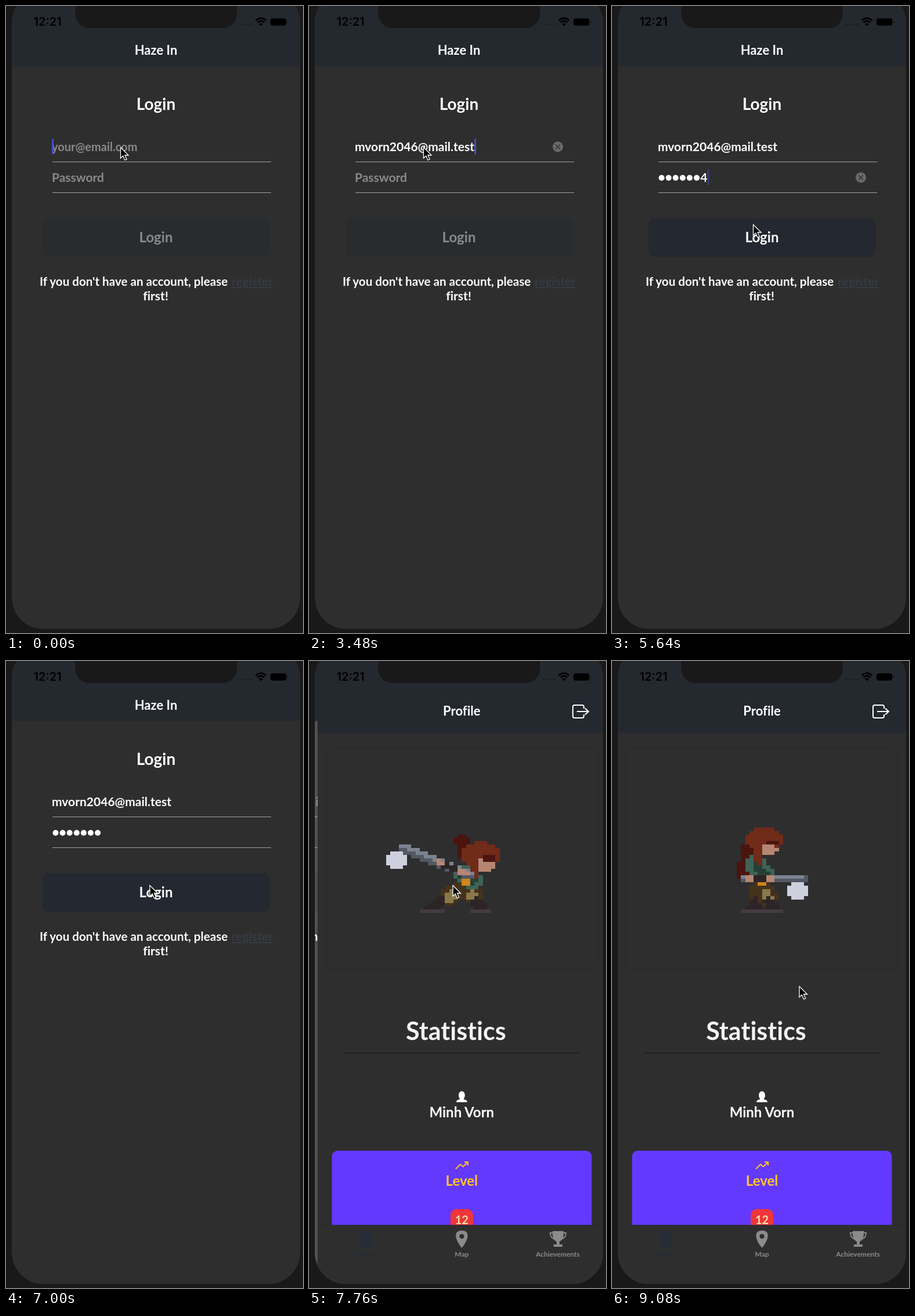
An HTML page for the animation above (9120 ms loop, 512x1080 px).

```html
<!DOCTYPE html>
<html lang="en">
<head>
<meta charset="utf-8">
<title>Login flow</title>
<style>
  html, body { margin: 0; width: 100%; height: 100%; overflow: hidden; background: #191919; }
  svg { display: block; width: 512px; height: 1080px; }
  text { font: 700 21px Lato, sans-serif; font-variant-ligatures: none; fill: #fff; white-space: pre; }
  .mid { text-anchor: middle; }
  .hint { fill: #8a8a8a; }
  .line { fill: none; stroke-width: 2; }
  .tab text { font-size: 12px; }
  .tab, .tab text { fill: #8b8b8b; }
  .tab.on, .tab.on text { fill: #252d38; }
</style>
</head>
<body>
<svg viewBox="0 0 512 1080">
  <defs>
    <clipPath id="screen"><rect x="10" y="-25" width="497" height="1098" rx="54"/></clipPath>
    <clipPath id="aboveTabs"><rect width="512" height="971.5"/></clipPath>
    <g id="clear"><circle r="9"/><path d="M-4-4 4 4M4-4-4 4" stroke="#2e2e2e" stroke-width="1.3"/></g>
    <path id="sheet" d="M93 982 107 988 93 995 79 988Z"/>
  </defs>

  <g clip-path="url(#screen)">
    <rect width="512" height="1080" fill="#2e2e2e"/>
    <rect width="512" height="103.5" fill="#242930"/>

    <g id="login">
      <text id="appTitle" class="mid" x="258.5" y="84" style="font-size:22px">Haze In</text>
      <text class="mid" x="258.5" y="179" style="font-size:28px">Login</text>
      <path d="M80 268.5H457M80 321.5H457" stroke="#a2a2a2"/>
      <rect id="highlight" x="60" y="268" width="397" height="53.5" fill="#b5b5b5"/>
      <text id="mailHint" class="hint" x="79" y="250" style="font-size:20px">your@email.com</text>
      <text id="passHint" class="hint" x="79" y="303">Password</text>
      <text id="mail" x="79" y="250"></text>
      <g id="bullets" fill="#fff"></g>
      <text id="lastKey" y="303"></text>
      <rect id="caret" width="2.6" height="27" rx="1" fill="#4553dc"/>
      <use id="mailClear" href="#clear" x="429" y="242.5" fill="#6a6a6a"/>
      <use id="passClear" href="#clear" x="429" y="295.5"/>
      <g id="button">
        <rect id="buttonBack" x="62.5" y="365.5" width="392" height="66.5" rx="11"/>
        <text id="buttonText" class="mid" x="258.5" y="407" style="font-size:24px">Login</text>
      </g>
      <text x="58" y="482" style="font-size:20.6px">If you don't have an account, please </text>
      <text x="389" y="482" style="fill:#363b44;text-decoration:underline">register</text>
      <text class="mid" x="258" y="507">first!</text>
    </g>
    <rect id="veil" y="103.5" width="512" height="977" fill="#fff"/>

    <g id="profile">
      <rect x="10" width="497" height="1080" fill="#2e2e2e"/>
      <rect x="10" width="497" height="124" fill="#242930"/>
      <text class="mid" x="258.5" y="94" style="font-size:22px">Profile</text>
      <path class="line" d="M469 82V79Q469 76 466 76H453Q450 76 450 79V95Q450 98 453 98H466Q469 98 469 95V92M457 87H476M471 81.5 477 87 471 92.5" stroke="#fff"/>
      <rect x="26" y="151" width="465" height="378" rx="10" fill="#2e2e2e" style="filter:drop-shadow(0 0 4px #0002)"/>
      <g id="sprite" transform="translate(26.5 151) scale(7.25 5.9)" shape-rendering="crispEdges"></g>
      <text class="mid" x="248.5" y="653" style="font-size:43px;fill:#f4f4f6">Statistics</text>
      <path d="M54 675.5H463" stroke="#171717"/>
      <g fill="#fff"><ellipse cx="258.5" cy="748" rx="5.5" ry="7"/><path d="M255 752H262V755Q268 756 268 760H249Q249 756 255 755Z"/></g>
      <text class="mid" x="258.5" y="786" style="font-size:24px">Minh Vorn</text>
      <g clip-path="url(#aboveTabs)">
        <rect x="34.5" y="843.5" width="448" height="200" rx="10" fill="#6439ff"/>
        <path class="line" d="M248 875 256 867 261 871 269 863M263 863H269V869" stroke="#ffc629"/>
        <text class="mid" x="258.5" y="904" style="font-size:24px;fill:#ffc629">Level</text>
        <rect x="239" y="944" width="39" height="40" rx="11" fill="#f0353b"/>
        <text class="mid" x="258.5" y="970" style="font-size:20px;fill:#ffe0a3">12</text>
      </g>
      <path d="M10 972H507" stroke="#292929"/>
      <g class="tab on mid">
        <use href="#sheet"/><use href="#sheet" y="8"/><use href="#sheet" y="16"/>
        <text x="93" y="1026">Profile</text>
      </g>
      <g class="tab mid">
        <path d="M258.5 981C272 981 272 994 258.5 1011C245 994 245 981 258.5 981Z"/>
        <circle cx="258.5" cy="991" r="4" fill="#2e2e2e"/>
        <text x="258.5" y="1026">Map</text>
      </g>
      <g class="tab mid">
        <path d="M415 982H434V986C434 995 431 998 427 1000V1005H432V1009H417V1005H422V1000C418 998 415 995 415 986Z"/>
        <path class="line" d="M415 985H411Q411 994 419 996M434 985H438Q438 994 430 996" stroke="#8b8b8b"/>
        <text x="424" y="1026">Achievements</text>
      </g>
    </g>
  </g>

  <path d="M119.5 0V14A24 24 0 0 0 143.5 38H374A24 24 0 0 0 398 14V0Z" fill="#191919"/>
  <text x="47.5" y="34" style="font:600 20px Inter,sans-serif;fill:#000">12:21</text>
  <path d="M405 32H424" stroke="#15181c" stroke-width="4" stroke-linecap="round" stroke-dasharray="0 6" opacity=".55"/>
  <path d="M430.500 25Q439.500 17 448.500 25M433.500 28.500Q439.500 23 445.500 28.500" fill="none" stroke="#000" stroke-width="2.700"/>
  <path d="M436 31Q439.500 28 443 31L439.500 34.500Z"/>
  <rect x="456" y="21.500" width="27" height="12" rx="3.500" stroke="#000" stroke-opacity=".45"/>
  <path d="M485 25Q488 27.500 485 30Z" opacity=".6"/>
  <path id="pointer" d="M0 0V18.500L4.300 14.600 7.500 22 10.600 20.700 7.500 13.500H13.500Z" stroke="#fff" stroke-width="1.300"/>
</svg>

<script>
const LOOP = 9120, MAIL = 'mvorn2046@mail.test', PASS = 'hzk82m4';
const $ = id => document.getElementById(id);
const set = (id, attrs) => { for (const k in attrs) $(id).setAttribute(k, attrs[k]); };
const show = (id, on) => set(id, { opacity: +on });
const ramp = (t, a, b) => Math.min(1, Math.max(0, (t - a) / (b - a)));
const ease = (t, a, b) => { const x = ramp(t, a, b); return x * x * (3 - 2 * x); };

// Pixel figure: simple solids sampled on a 64 x 64 grid, posed by its joints
const add = ([x, y], dx, dy) => [x + dx, y + dy];
const mix = (a, b, k) => [a[0] + (b[0] - a[0]) * k, a[1] + (b[1] - a[1]) * k];
const oval = ([cx, cy], rx, ry) => (x, y) => Math.hypot((x - cx) / rx, (y - cy) / ry) <= 1;
const limb = (a, b, width) => (x, y) => {
  const dx = b[0] - a[0], dy = b[1] - a[1];
  const [px, py] = mix(a, b, ramp((x - a[0]) * dx + (y - a[1]) * dy, 0, dx * dx + dy * dy));
  return Math.hypot(x - px, y - py) <= width / 2;
};
// Broken crescent left behind by the swing
const crescent = (x, y) => {
  const angle = Math.atan2((y - 36) / 12, (x - 34) / 23) * 180 / Math.PI;
  return oval([34, 36], 23, 12)(x, y) && !oval([35, 34.5], 18, 9)(x, y)
    && angle > -95 && angle < 176 && (angle > 110 || (angle + 100) % 34 > 6);
};

const poses = {
  idle: { head: [32.5, 26.5], tail: [27.5, 37], hip: [32, 40], feet: [[30, 46.5], [34.5, 46.5]],
    grip: [28, 38], point: [41.5, 38], blade: [40.5, 41.5] },
  slash: { head: [36, 30], tail: [20, 34.5], hip: [34, 40], feet: [[27, 45.5], [38, 42]],
    grip: [33, 36], point: [12, 36] },
  recover: { head: [36.5, 31], tail: [32, 27], hip: [33, 40], feet: [[25, 46.5], [36.5, 46.5]],
    grip: [34, 37], point: [18, 29], blade: [16.5, 32.5] }
};

function figure({ head, tail, hip, feet, grip, point, blade }) {
  let art = '';
  const fill = (color, inside) => {
    let d = '';
    for (let y = 0; y < 64; y++) for (let x = 0; x < 64; x++)
      if (inside(x + .5, y + .5)) d += `M${x} ${y}h1v1h-1z`;
    art += `<path fill="${color}" d="${d}"/>`;
  };
  const shoulder = add(head, -2, 7.5);
  fill('#4a150f', limb(add(head, -3, 1), tail, 3.6));
  for (const foot of feet) {
    fill('#45321c', limb(hip, mix(hip, foot, .5), 5));
    fill('#8a784b', limb(mix(hip, foot, .4), mix(hip, foot, .6), 2.6));
    fill('#2c2426', limb(mix(hip, foot, .75), foot, 3));
    fill('#453a40', oval(add(foot, 0, 1), 2.6, .8));
  }
  fill('#3f6355', limb(shoulder, add(hip, 0, -3.5), 5.5));
  fill('#702b19', oval(head, 4.8, 3.6));
  fill('#b58672', oval(add(head, 1.2, 3), 2, 2));
  fill('#702b19', limb(add(head, -1.5, 0), add(head, -1.5, 7), 1.2));
  fill('#4a150f', limb(add(head, 1, 1), add(head, 3, 1), 1));
  fill('#273e37', limb(shoulder, mix(grip, point, .4), 2.2));
  fill('#cd851f', oval(add(hip, 0, -1), 1.1, 1));
  fill('#525964', limb(grip, point, 2.4));
  fill('#7b8290', limb(add(grip, 0, -.6), add(point, 0, -.6), 1.2));
  fill('#2c2426', limb(mix(grip, point, .2), mix(grip, point, .35), 2));
  for (const k of [.1, .45]) fill('#b58672', oval(mix(grip, point, k), 1.2, 1.1));
  fill('#cfd0de', blade ? oval(blade, 2.8, 2.5) : crescent);
  return art;
}
for (const name in poses) $('sprite').innerHTML += `<g id="${name}">${figure(poses[name])}</g>`;

[...PASS].forEach((_, i) => {
  $('bullets').innerHTML += `<circle cx="${85.5 + 12.1 * i}" cy="296" r="5"/>`;
});

// Moment of each key press: an even rhythm with a few hesitations
const hesitations = [8, 9, 16, 17, 18];
const mailKeys = [...MAIL].map((_, i) => 120 * (i + 1) + 95 * hesitations.filter(h => h <= i).length);
const passKeys = [...PASS].map((_, i) => 4280 + i * 122);
const pressed = (keys, t) => keys.filter(k => k <= t).length;

function blink(age) {
  const p = age < 640 ? age : 640 + (age - 640) % 1000;
  if (p < 640) return 1 - ramp(p, 300, 440) + ramp(p, 620, 640);
  return 1 - ramp(p, 1040, 1180) + ramp(p, 1600, 1640);
}

function drawForm(t) {
  const cleared = t >= 7160, inPass = t >= 3760;
  const typed = cleared ? 0 : pressed(mailKeys, t), secret = cleared ? 0 : pressed(passKeys, t);
  $('mail').textContent = MAIL.slice(0, typed);
  show('mailHint', !typed);
  show('passHint', !secret);

  const masked = t < 6000 ? Math.max(0, secret - 1) : secret;
  [...$('bullets').children].forEach((dot, i) => dot.setAttribute('opacity', +(i < masked)));
  $('lastKey').textContent = PASS.slice(masked, secret);
  set('lastKey', { x: 79 + 12.2 * masked });

  const end = inPass ? 79 + 12.2 * masked + $('lastKey').getComputedTextLength()
                     : 79 + $('mail').getComputedTextLength();
  const last = Math.max(0, inPass ? 3760 : 0, ...mailKeys.concat(passKeys).filter(k => k <= t));
  set('caret', { x: end + .3, y: inPass ? 281.5 : 228.5, opacity: t < 6040 ? blink(t - last) : 0 });

  const glow = ramp(t, 3800, 3960) - ramp(t, 4560, 4640);
  show('highlight', glow);
  show('mailClear', typed && !inPass);
  show('passClear', secret && t < 6040);
  set('passClear', { fill: glow > .5 ? '#555' : '#6a6a6a' });

  const ready = secret > 5 || cleared;
  set('buttonBack', { fill: ready ? '#242830' : '#292c2e' });
  $('buttonText').style.fill = ready ? '#fff' : '#8a8a8a';
  show('button', 1 - .5 * (ramp(t, 6040, 6120) - ramp(t, 6180, 6290)));
}

function drawProfile(t) {
  // Critically damped push transition
  const z = 4 * Math.PI * Math.max(0, t - 7230) / 1000;
  const left = (1 + z) * Math.exp(-z), done = 1 - left;
  set('login', { transform: `translate(${-164 * done} 0)` });
  set('profile', { transform: `translate(${497 * left} 0)` });
  show('appTitle', 1 - .8 * done);
  show('veil', .175 * done);

  const beat = (t + 560) % 1000;
  const pose = beat < 160 ? 'slash' : beat < 400 ? 'recover' : 'idle';
  for (const name in poses) $(name).style.display = name === pose ? '' : 'none';
}

function frame() {
  const t = performance.now() % LOOP;
  drawForm(t);
  drawProfile(t);
  const a = ease(t, 5280, 5560), b = ease(t, 5760, 6000), c = ease(t, 8160, 8900);
  set('pointer', { transform: `translate(${197.5 + 46 * a + 4.5 * b + 75 * c} ${243.5 + 133 * a + 10 * b + 174 * c})` });
  requestAnimationFrame(frame);
}
frame();
</script>
</body>
</html>
```
